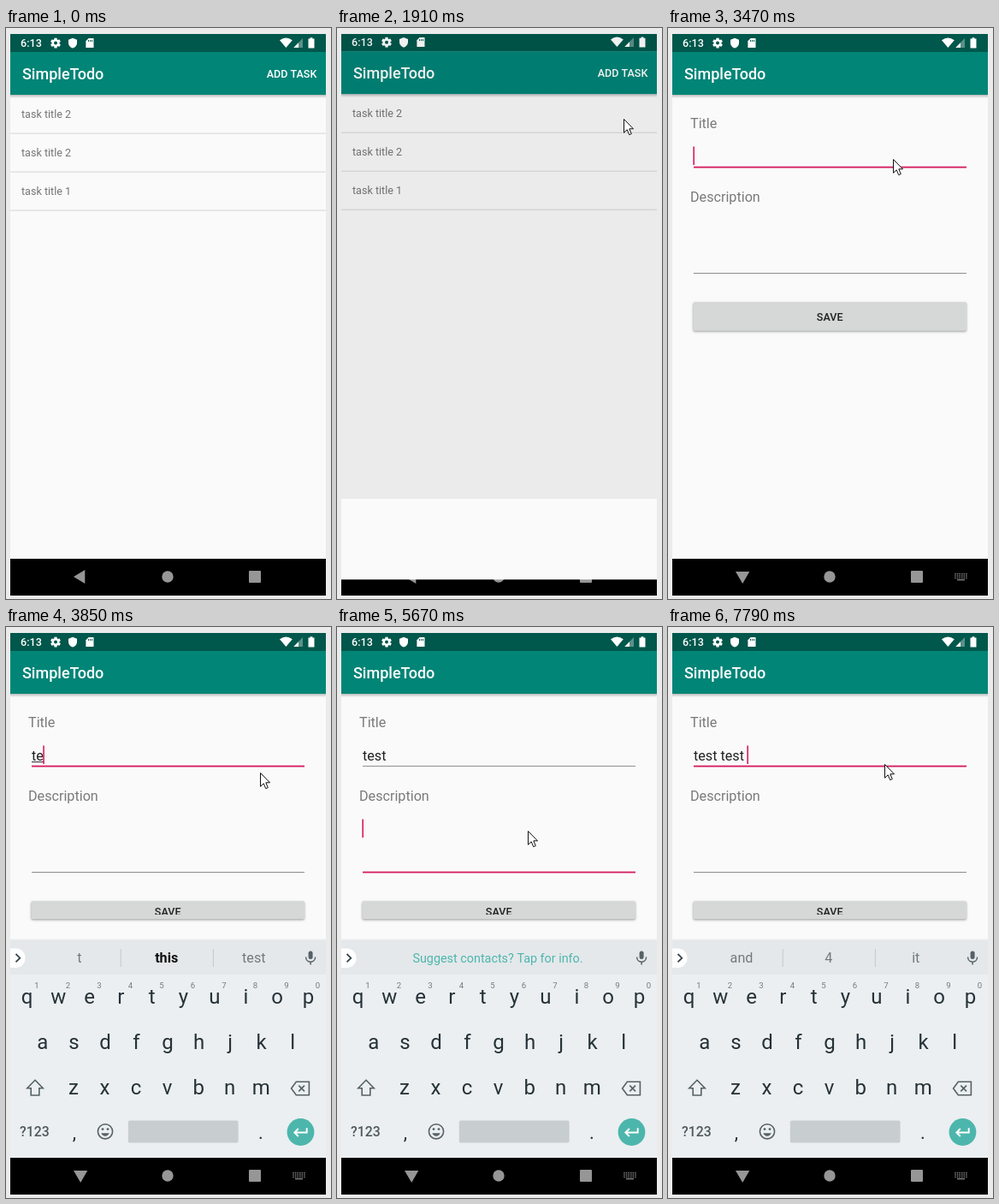
Animation, 380 px wide and 667 px high, one loop 8 s. Source, as an HTML page with a canvas:

```html
<!DOCTYPE html>
<html lang="en">
<head>
<meta charset="utf-8">
<title>Todo app</title>
<style>
html, body { margin: 0; width: 100%; height: 100%; overflow: hidden; background: #ebebeb; }
canvas { display: block; width: 380px; height: 667px; }
</style>
</head>
<body>
<canvas id="stage" width="380" height="667"></canvas>
<script>
const ctx = document.getElementById('stage').getContext('2d');
const LOOP = 8000, STEP = 77;
const TEAL = '#008577', PINK = '#d81b60', PAPER = '#fafafa', INK = '#263238', ICON = '#566166';

// [time, x, y] of the pointer tip
const POINTER = [
  [110, 300, 655], [250, 322, 560], [400, 350, 400], [560, 357, 240], [700, 345, 110],
  [830, 329, 49], [980, 336, 45], [1680, 336, 45], [1911, 335, 106], [2219, 315, 155],
  [2450, 263, 153], [3530, 263, 153], [3836, 297, 170], [4010, 321, 182], [4600, 321, 182],
  [4660, 360, 234], [4880, 360, 234], [5190, 223, 238], [5670, 223, 238],
  [5900, 246, 149], [6070, 253, 160]
];
// [time, text, start of the underlined word or -1]
const TYPED = [
  [0, '', -1], [3690, 't', 0], [3770, 'te', 0], [4330, 'tes', 0], [4890, 'test', 0],
  [5360, 'test', -1], [6620, 'test', 0], [6900, 'test ', -1], [7050, 'test t', 5],
  [7300, 'test te', 5], [7480, 'test tes', 5], [7560, 'test test', 5], [7790, 'test test ', -1]
];
const CONTACTS = ['Suggest contacts? Tap for info.'];
const HINTS = [
  [0, CONTACTS], [3690, ['t', 'this', 'test']], [4330, ['tes', 'test', 'yes']],
  [4390, ['test', 'tes', 'testing']], [4890, ['text', 'test', 'testing']], [5670, CONTACTS],
  [6620, ['text', 'test', 'tests']], [6900, ['and', '4', 'it']], [7050, ['t', 'this', 'test']],
  [7480, ['tes', 'test', 'yes']], [7560, ['text', 'test', 'testing']], [7790, ['and', '4', 'it']]
];

const clamp = v => Math.max(0, Math.min(1, v));
const mix = (a, b, p) => a + (b - a) * p;
const at = (list, t) => list.filter(e => e[0] <= t).pop();

function rect(x, y, w, h, fill) {
  ctx.fillStyle = fill;
  ctx.fillRect(x, y, w, h);
}
function round(x, y, w, h, r, fill) {
  ctx.beginPath();
  ctx.roundRect(x, y, w, h, r);
  ctx.fillStyle = fill;
  ctx.fill();
}
function disc(x, y, r, fill) {
  ctx.beginPath();
  ctx.arc(x, y, r, 0, Math.PI * 2);
  ctx.fillStyle = fill;
  ctx.fill();
}
function shape(d, fill, stroke, width = 1.6) {
  const path = new Path2D(d);
  if (fill) { ctx.fillStyle = fill; ctx.fill(path); }
  if (stroke) { ctx.strokeStyle = stroke; ctx.lineWidth = width; ctx.stroke(path); }
}
function font(size, weight = 400) {
  ctx.font = `${weight} ${size}px Roboto, sans-serif`;
}
function text(str, x, y, size, fill, weight, align = 'left') {
  font(size, weight);
  ctx.textAlign = align;
  ctx.fillStyle = fill;
  ctx.fillText(str, x, y);
}
function shade(y, h, alpha) {
  const g = ctx.createLinearGradient(0, y, 0, y + h);
  g.addColorStop(0, `rgba(0,0,0,${alpha})`);
  g.addColorStop(1, 'rgba(0,0,0,0)');
  rect(5, y, 369, h, g);
}
function clipped(x, y, w, h, draw) {
  ctx.save();
  ctx.beginPath();
  ctx.rect(x, y, w, h);
  ctx.clip();
  draw();
  ctx.restore();
}

function gear(x, y) {
  for (let i = 0; i < 6; i++) {
    ctx.save();
    ctx.translate(x, y);
    ctx.rotate(i * Math.PI / 3);
    rect(-1.6, -5.9, 3.2, 3, '#fff');
    ctx.restore();
  }
  disc(x, y, 4.5, '#fff');
  disc(x, y, 2, '#00574b');
}
function statusBar() {
  rect(5, 7, 369, 21, '#00574b');
  text('6:13', 17, 22.3, 12.6, '#fff', 500);
  gear(58, 17.6);
  shape('M78 11.8L83 13.8V17.4C83 20.4 81 22.6 78 23.6C75 22.6 73 20.4 73 17.4V13.8Z', '#fff');
  shape('M96.6 12H102.5V23H93.4V15.2Z', '#fff');
  shape('M96.5 14v2M98.6 14v2M100.6 14v2', null, '#00574b', 1);
  shape('M320 14.3Q327.3 8.7 334.8 14.3L327.4 23Z', '#fff');
  shape('M347 12V23H336.3Z', 'rgba(255,255,255,.35)');
  shape('M342 17.2V23H336.3Z', '#fff');
  shape('M353.5 12.6H355.6V11.3H358.4V12.6H360.5V23.4H353.5Z', '#fff');
}
function chrome() {
  rect(5, 7, 369, 613, PAPER);
  shade(78, 4, .26);
  rect(5, 28, 369, 50, TEAL);
  statusBar();
  text('SimpleTodo', 19, 60, 18, '#fff', 500);
}

function listScreen(t) {
  chrome();
  text('ADD TASK', 363.3, 57.8, 12.57, '#fff', 500, 'right');
  ['task title 2', 'task title 2', 'task title 1'].forEach((s, i) => {
    text(s, 18, 105.3 + 45 * i, 12.57, '#757575');
    rect(5, 122.5 + 45 * i, 369, 1.3, '#dedede');
  });
  if (t >= 1210 && t < 1360) {
    const p = (t - 1210) / 150;
    disc(329.5, 52.5, mix(14, 22, p), `rgba(255,255,255,${mix(.2, .07, p)})`);
  }
}

function field(y, focus) {
  rect(30, y - .5, 319, 1, '#8c8c8c');
  if (!focus) return;
  ctx.globalAlpha = focus;
  rect(30, y - .9, 319, 1.8, PINK);
  ctx.globalAlpha = 1;
}
function saveButton(small) {
  const h = small ? 21 : 33.5;
  ctx.save();
  ctx.shadowColor = 'rgba(0,0,0,.38)';
  ctx.shadowBlur = 2.5;
  ctx.shadowOffsetY = 1;
  round(29.5, 320.3, 319.5, h, 1.8, '#d6d7d7');
  ctx.restore();
  clipped(29, 320, 320, small ? 16 : 34, () =>
    text('SAVE', 189.2, small ? 337.2 : 341.7, 12.57, '#212121', 500, 'center'));
}
function formScreen(t, small) {
  const toTitle = t < 5000 ? clamp((t - 2590) / 180) : t < 5360 ? 1 : clamp((t - 6150) / 220);
  const first = t < 5360 ? toTitle : 0;
  const title = t < 5360 ? first : toTitle;
  const body = t < 5360 || t >= 6370 ? 0 : t < 6220 ? clamp((t - 5290) / 210) : 1 - toTitle;
  chrome();
  text('Title', 26, 117.4, 16.16, '#7a7a7a');
  text('Description', 26, 203.4, 16.16, '#7a7a7a');
  field(162.6, title);
  field(286.5, body);
  saveButton(small);

  const [, str, start] = at(TYPED, t);
  text(str, 30, 155.7, 16.16, '#212121');
  const width = ctx.measureText(str).width;
  if (start >= 0) {
    const from = ctx.measureText(str.slice(0, start)).width;
    rect(30 + from, 157.2, width - from, 1, '#212121');
  }
  if (title > .4) rect(29.4 + width, 138.5, 1.6, 21.5, PINK);
  else if (body > .4) rect(29.4, 224.5, 1.6, 21.5, PINK);
}

function hints(t) {
  rect(5, 366, 369, 40, '#e4e8eb');
  round(5, 375.5, 17.5, 22.5, [0, 11, 11, 0], '#fff');
  shape('M11.5 382L16.3 386.7L11.5 391.4', null, '#37474f', 1.8);
  const words = at(HINTS, t)[1];
  if (words.length === 1) {
    text(words[0], 188, 391.8, 14.37, '#4db6ac', 400, 'center');
  } else {
    const bold = words[1] !== '4';
    words.forEach((w, i) => {
      const strong = bold && i === 1;
      text(w, [86, 187.7, 289.8][i], 392.4, 16.16, strong ? '#111' : '#72797d', strong ? 700 : 400, 'center');
    });
    rect(133.7, 376, 1, 21, '#c3c9cc');
    rect(241.9, 376, 1, 21, '#c3c9cc');
  }
  round(353.6, 378.5, 5, 9.6, 2.5, ICON);
  shape('M350.6 385.5C350.6 393 361.6 393 361.6 385.5M356.1 391V394.6', null, ICON, 1.5);
}
function keyRow(keys, x, y) {
  [...keys].forEach((k, i) => text(k, x + 36.55 * i, y, 24, INK, 400, 'center'));
}
function keyboard(t) {
  rect(5, 366, 369, 254, '#ebeff1');
  hints(t);
  keyRow('qwertyuiop', 24.6, 440.3);
  [...'1234567890'].forEach((n, i) => text(n, 36 + 36.5 * i, 422, 9.6, '#737b7f', 400, 'center'));
  keyRow('asdfghjkl', 42.8, 493);
  keyRow('zxcvbnm', 79, 545.6);
  shape('M34 529.3L43.2 538.7H38.8V547H29.2V538.7H24.8Z', null, ICON);
  shape('M339.3 531.2H354.4V546.8H339.3L333.6 539Z', null, ICON);
  shape('M342.3 535.6L349 542.4M349 535.6L342.3 542.4', null, ICON);
  text('?123', 33.4, 595.2, 15.8, '#4f5a5f', 500, 'center');
  text(',', 80, 598, 22, INK, 400, 'center');
  text('.', 298, 598, 22, INK, 400, 'center');
  shape('M124.6 589.3A8.6 8.6 0 1 1 107.4 589.3A8.6 8.6 0 1 1 124.6 589.3', null, ICON);
  disc(113, 586.6, 1.4, ICON);
  disc(119, 586.6, 1.4, ICON);
  shape('M111.3 591.2H120.7C119 595.8 113 595.8 111.3 591.2Z', ICON);
  round(142.8, 576.5, 128.8, 26, 2, '#c8cdd0');
  disc(344.5, 590, 15.9, '#4db6ac');
  shape('M351.7 585.3V590.5H337.8M341.8 586L337.3 590.5L341.8 595', null, '#fff', 1.9);
}

function navBar(typing) {
  const grey = '#969696';
  rect(5, 620, 369, 43, '#000');
  shape(typing ? 'M79 635H95.3L87.2 649Z' : 'M79 641L92.3 633V649Z', grey);
  disc(189, 641, 6.7, grey);
  round(284, 634, 14, 14, 1, grey);
  if (!typing) return;
  for (let r = 0; r < 3; r++)
    for (let c = 0; c < 6; c++) rect(335.2 + c * 2.6, 637 + r * 2.4, 1.5, 1.4, '#858585');
  rect(338, 644, 9, 1.3, '#858585');
}

function pointer(t) {
  if (t < POINTER[0][0]) return;
  const i = POINTER.findIndex(k => k[0] > t);
  let [t0, x, y] = POINTER[i < 0 ? POINTER.length - 1 : i - 1];
  if (i > 0) {
    const [t1, x1, y1] = POINTER[i];
    const p = (t - t0) / (t1 - t0);
    x = mix(x, x1, p);
    y = mix(y, y1, p);
  }
  ctx.save();
  ctx.translate(x + .5, y + .5);
  shape('M0 0V15.8L3.7 12.3L6.2 18.2L8.8 17.1L6.3 11.3H11Z', '#fff', '#111', 1);
  ctx.restore();
}

function draw(now) {
  const t = now % LOOP;
  // screen motion advances in even ticks
  const q = Math.max(0, 1680 + Math.floor((t - 1675) / STEP) * STEP);
  const open = 1 - Math.pow(1 - clamp((q - 1900) / 430), 3);
  const rise = clamp((q - 3470) / 150);

  rect(0, 0, 380, 667, '#ebebeb');
  navBar(t >= 3230);
  clipped(5, 7, 369, 656, () => {
    if (open < 1) {
      ctx.save();
      ctx.translate(0, -12 * open);
      clipped(5, 7, 369, 613, () => listScreen(t));
      ctx.restore();
      if (open > 0) rect(5, 7, 369, 613, `rgba(0,0,0,${Math.min(.1, open * .8)})`);
    }
    if (open > 0) {
      const shift = 26.5 * (1 - open), top = mix(594, 7, open);
      clipped(5, top, 369, 620 + shift - top, () => {
        ctx.translate(0, shift);
        formScreen(t, rise > .5);
        if (shift > 0) statusBar();
      });
      if (top < 28) statusBar();
    }
    if (rise > 0) clipped(5, 362, 369, 258, () => {
      ctx.translate(0, 254 * (1 - rise));
      rect(5, 364.5, 369, 1.5, 'rgba(0,0,0,.05)');
      keyboard(t);
    });
  });
  pointer(q);
}

const begin = performance.now();
function tick() {
  draw(performance.now() - begin);
  requestAnimationFrame(tick);
}
tick();
</script>
</body>
</html>
```
